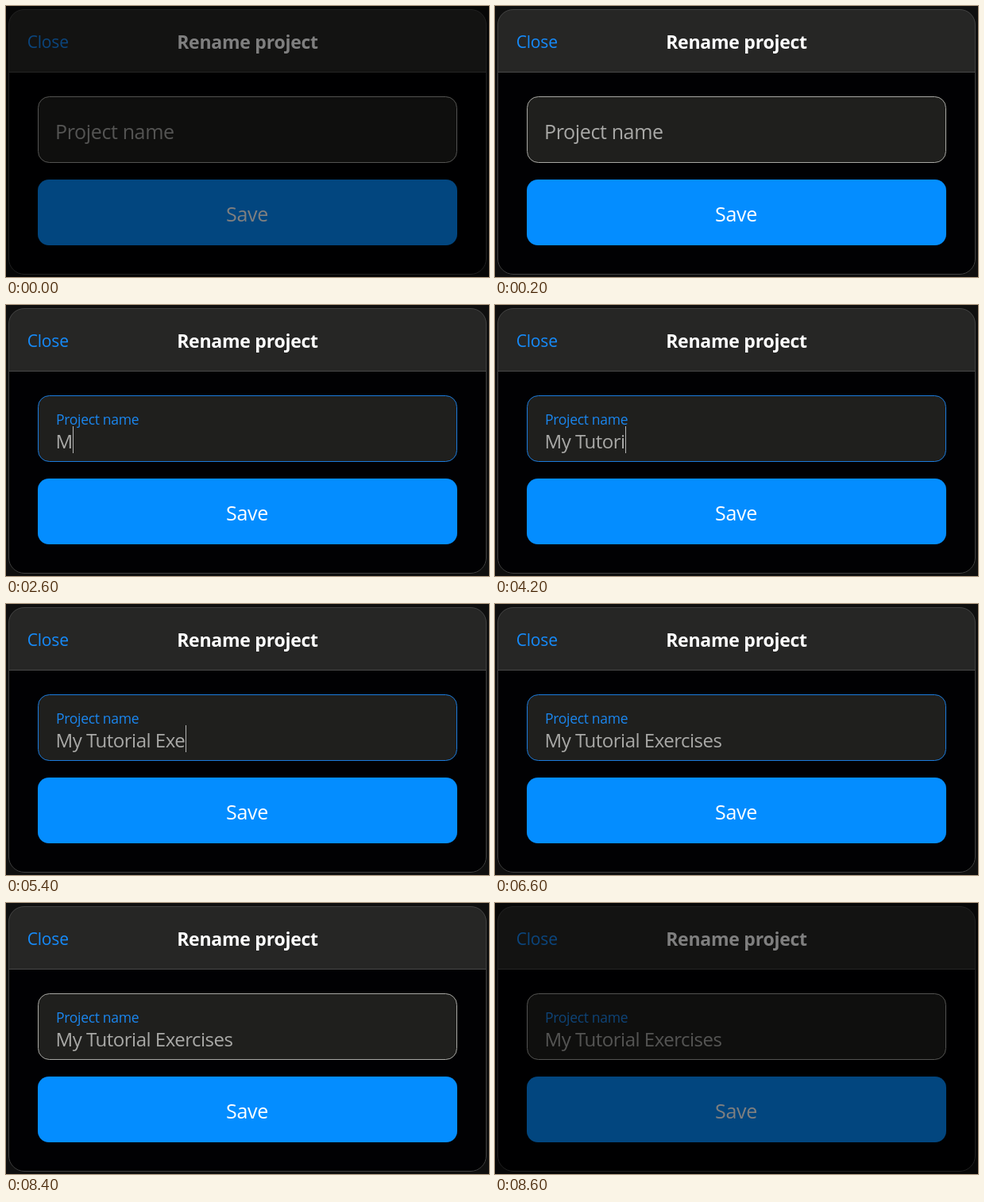
Recreate the animation shown at these times as an HTML page. Size 608 by 342 pixels, loop 8.8 s.

```html
<!DOCTYPE html>
<html lang="en">
<head>
<meta charset="utf-8">
<title>Rename project</title>
<style>
  html, body { margin: 0; width: 100%; height: 100%; overflow: hidden; background: #0f0f0f; }
  svg { display: block; width: 608px; height: 342px; }
  text { font-family: "Open Sans", "Noto Sans", sans-serif; font-size: 25px; letter-spacing: -.35px; white-space: pre; }
  #title { font-size: 23px; font-weight: 700; letter-spacing: -.25px; fill: #fff; text-anchor: middle; }
  #close { font-size: 21px; letter-spacing: -.2px; fill: #168bfb; }
  #save { fill: #fff; text-anchor: middle; }
  #placeholder, #typed { fill: #a9a9a7; }
  #label { font-size: 17.5px; letter-spacing: -.3px; fill: #1b86ee; }
  #typed { font-size: 24px; letter-spacing: -.5px; }
  #field { fill: #1f1f1d; stroke: #a8a8a4; }
  #field.focused { stroke: #1b7bdd; }
</style>
</head>
<body>
<svg viewBox="0 0 608 342">
  <clipPath id="panel"><rect x="3" y="4" width="602" height="335" rx="20"/></clipPath>
  <g clip-path="url(#panel)">
    <rect width="608" height="342" fill="#010103"/>
    <rect width="608" height="83" fill="#262625"/>
    <rect y="83" width="608" height="1" fill="#484848"/>
  </g>
  <rect x="3.5" y="4.5" width="601" height="334" rx="19.5" fill="none" stroke="#414141"/>
  <text id="close" x="26.7" y="53">Close</text>
  <text id="title" x="304" y="54">Rename project</text>
  <rect id="field" x="40.5" y="114.5" width="527" height="83" rx="14"/>
  <text id="placeholder" x="62" y="168">Project name</text>
  <text id="label" x="63" y="151">Project name</text>
  <text id="typed" x="62.5" y="181"></text>
  <rect id="caret" y="153" width="1" height="34" fill="#b4b4b4"/>
  <rect x="40" y="219" width="528" height="83" rx="14" fill="#048dff"/>
  <text id="save" x="303.5" y="272">Save</text>
  <rect id="shade" width="608" height="342" fill="#000" opacity=".5"/>
</svg>
<script>
const LOOP = 8800, STEP = 200;
const FOCUS = 1400, BLUR = 8200, TYPE_START = 2600, KEY_DELAY = 190;
const NAME = 'My Tutorial Exercises';

const el = id => document.getElementById(id);
const show = (id, visible) => el(id).style.display = visible ? '' : 'none';
const within = (t, from, to) => t >= from && t < to;

function draw(t) {
  const count = t < TYPE_START ? 0 : Math.floor((t - TYPE_START) / KEY_DELAY) + 1;
  const typed = el('typed');
  typed.textContent = NAME.slice(0, count);

  show('shade', t < STEP || t >= LOOP - STEP);
  show('placeholder', t < FOCUS);
  show('label', t >= FOCUS);
  el('field').classList.toggle('focused', within(t, FOCUS, BLUR));

  // The caret blinks while idle and stays solid while typing.
  show('caret', within(t, FOCUS, 1800) || within(t, 2200, 6600) || within(t, 7200, 7600));
  const width = count ? typed.getComputedTextLength() : 0;
  el('caret').setAttribute('x', Math.round(63 + width));
}

function tick() {
  const t = performance.now() % LOOP;
  draw(Math.floor(t / STEP) * STEP);
  requestAnimationFrame(tick);
}
tick();
</script>
</body>
</html>
```
